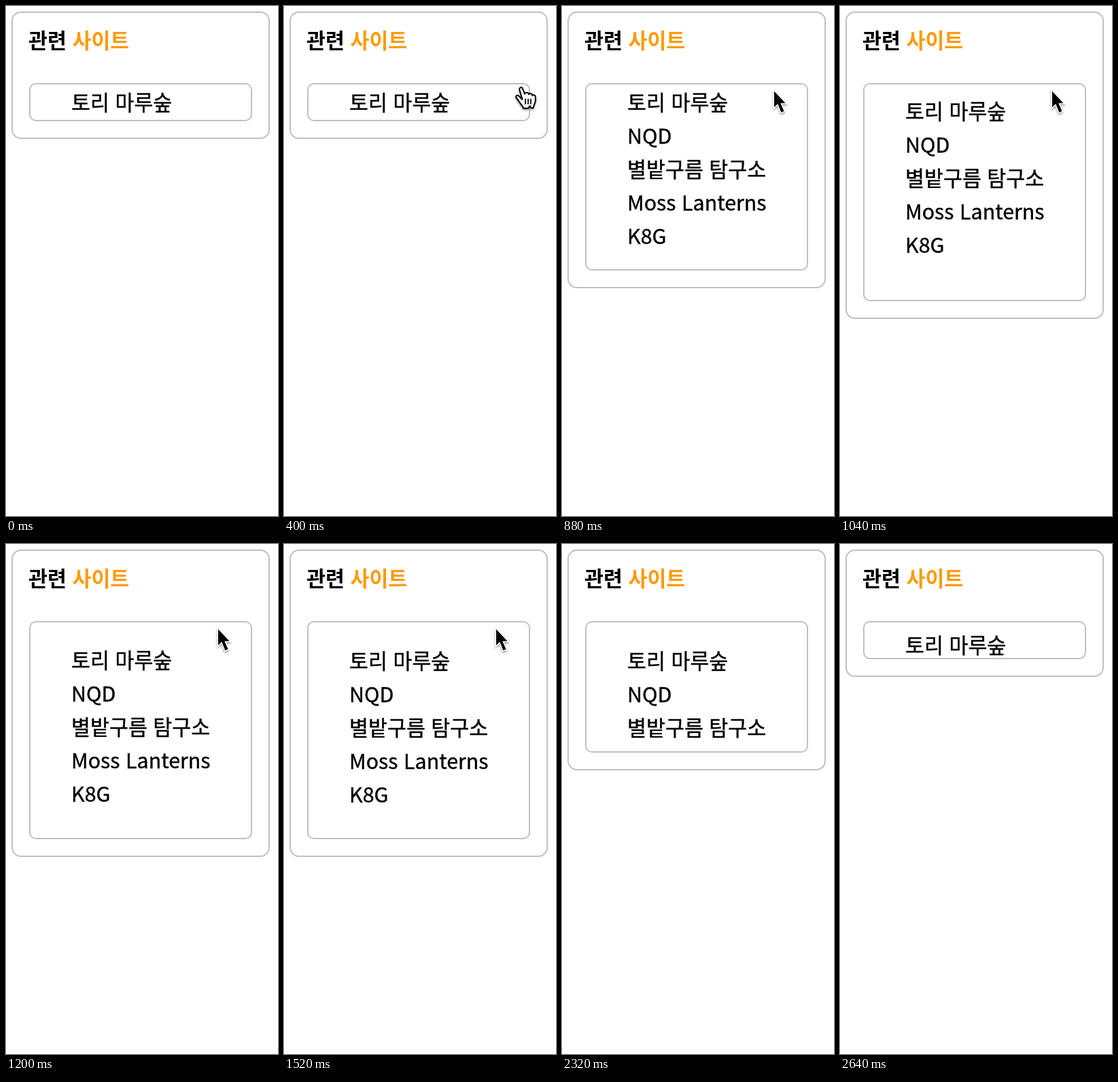
Animation of 400x748 px, one loop 2.72 s. Source, as an HTML page:

```html
<!DOCTYPE html>
<html lang="ko">
<head>
<meta charset="utf-8">
<title>관련 사이트</title>
<style>
  html, body { margin: 0; width: 100%; height: 100%; overflow: hidden; background: #fff; }
  body {
    position: relative;
    font: 30.4px/49px "Noto Sans CJK KR", "Noto Sans CJK", "Noto Sans CJK JP", sans-serif;
    white-space: nowrap;
    color: #000;
  }
  .card, .list { position: absolute; box-sizing: border-box; border: 2px solid #c1c1c1; }
  .card { left: 8px; top: 8px; width: 380px; height: 187px; border-radius: 14px; }
  .list { left: 34px; top: 113px; width: 328px; height: 56px; border-radius: 10px; overflow: hidden; }
  h1 { position: absolute; left: 33px; top: 25px; margin: 0; font: inherit; font-weight: 700; }
  h1 span { color: #fc9b0c; }
  ul {
    position: absolute; left: 60px; top: 1px; margin: 0; padding: 0; list-style: none;
    -webkit-text-stroke: .4px #000;
  }
  li { height: 49px; }
  svg { position: absolute; left: 0; top: 0; overflow: visible; filter: drop-shadow(0 2px 1.5px rgba(0, 0, 0, .4)); }
</style>
</head>
<body>
<div class="card"></div>
<h1>관련 <span>사이트</span></h1>
<div class="list">
  <ul>
    <li>토리 마루숲</li>
    <li>NQD</li>
    <li>별밭구름 탐구소</li>
    <li>Moss Lanterns</li>
    <li>K8G</li>
  </ul>
</div>
<svg id="hand" width="32" height="36" fill="#fff" stroke="#000" stroke-width="2" stroke-linejoin="round" stroke-linecap="round">
  <path d="M10.500 19L6.500 5.500C5.500 .5 10 0 11.200 4L14 11C15 8 19.500 8.500 20 11.500C21 9.500 25 10 25.300 13.500C27 11.500 29.800 12.500 29.800 16V20C29.800 25 27 27 26.500 31.500H23.500L21.500 28.500L19 32H12C11.500 28.500 7 25 4.500 20.500C3 17.500 .5 16.500 1.200 14.200C3 11.500 6.500 14 8.500 17.500Z"/>
  <path d="M15 18.500V25.500M19 18.500V25.500M23 18.500V25.500" stroke-width="1.700"/>
</svg>
<svg id="arrow" width="24" height="38">
  <path d="M2 2V25.500L7.300 20.500L12.300 33L16.500 31.200L11.300 19.500H18.500Z" fill="#000" stroke="#fff" stroke-width="3" paint-order="stroke"/>
</svg>
<script>
  const LOOP = 2720, SPAN = 2800, STEP = 80;
  const tracks = [];

  // Each row is [time, style, easing towards the next row].
  function track(selector, rows) {
    const frames = rows.map(([time, style, easing = "linear"]) =>
      ({ offset: time / SPAN, easing, ...style }));
    const anim = document.querySelector(selector)
      .animate(frames, { duration: SPAN, fill: "both" });
    anim.pause();
    tracks.push(anim);
  }

  // Goes from a to b and back, easing through both changes.
  function toggle(selector, a, b, [open, opened, close, closed]) {
    track(selector, [
      [0, a], [open, a, "ease"], [opened, b],
      [close, b, "ease"], [closed, a], [SPAN, a]
    ]);
  }

  const height = px => ({ height: px + "px" });
  const shift = y => ({ transform: `translateY(${y}px)` });
  const at = (x, y, opacity = 1) => ({ transform: `translate(${x}px, ${y}px)`, opacity });

  const folding = [722, 1022, 2230, 2550];
  toggle(".card", height(187), height(451), folding);
  toggle(".list", height(56), height(320), folding);
  toggle("ul", shift(0), shift(30), [962, 1262, 2500, SPAN - 1]);

  const hold = "step-end";
  track("#hand", [
    [0, at(340, 118, 0), hold],
    [400, at(340, 118)],
    [560, at(336, 118)],
    [720, at(301, 126), hold],
    [880, at(301, 126, 0), hold],
    [SPAN, at(301, 126, 0)]
  ]);
  track("#arrow", [
    [0, at(310, 123, 0), hold],
    [880, at(310, 123), hold],
    [1760, at(310, 123)],
    [1920, at(316, 123), hold],
    [2320, at(316, 123, 0), hold],
    [SPAN, at(316, 123, 0)]
  ]);

  const start = performance.now();
  function draw(now) {
    const time = Math.max(0, now - start) % LOOP;
    // One millisecond past the step, clear of rounding at hard changes.
    const stepped = Math.floor(time / STEP) * STEP + 1;
    for (const anim of tracks) anim.currentTime = stepped;
    requestAnimationFrame(draw);
  }
  draw(start);
</script>
</body>
</html>
```
